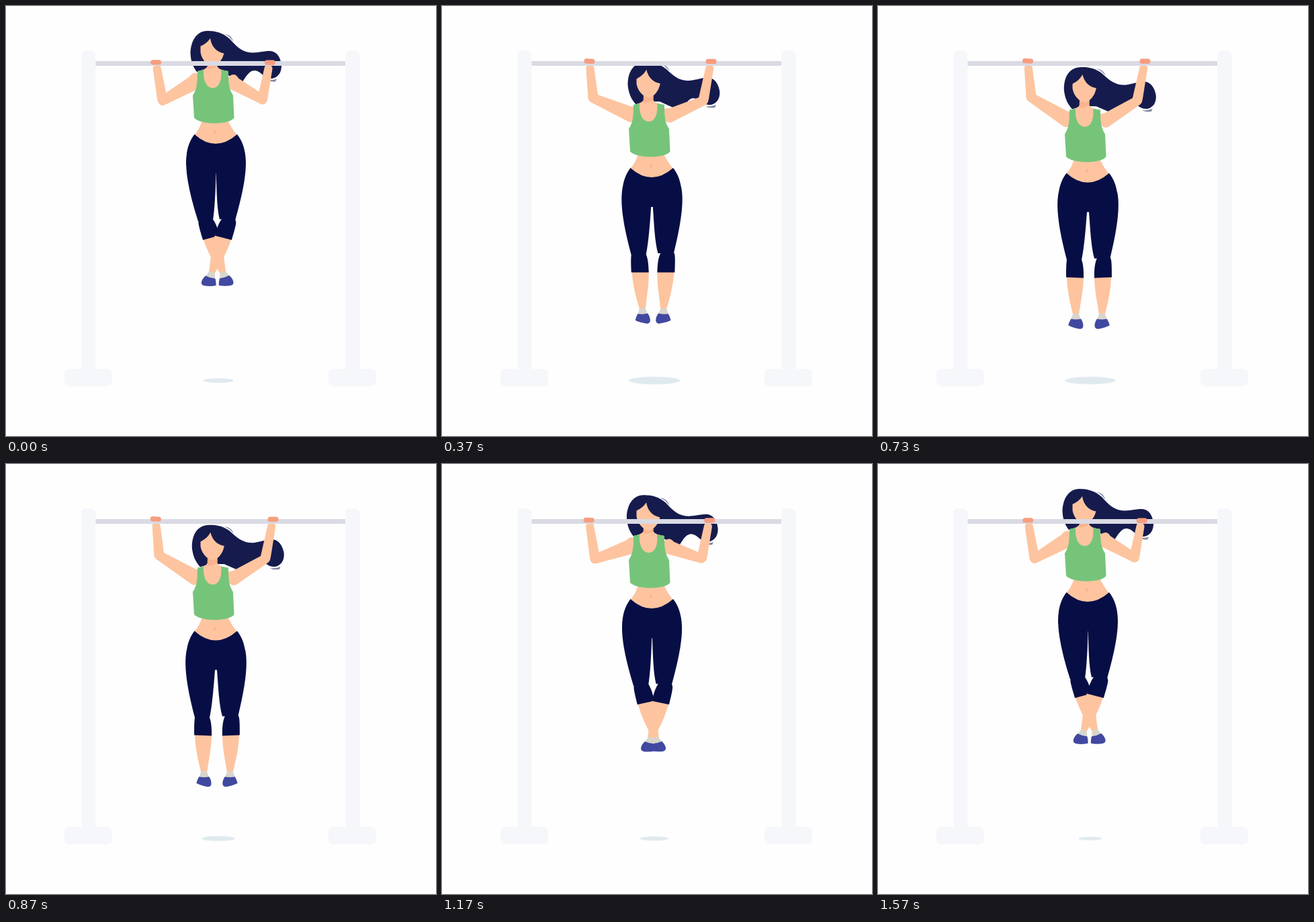
These frames come from a looping animation (640 px wide and 640 px high, 1610 ms). An HTML page without scripts:

```html
<!DOCTYPE html>
<html lang="en">
<head>
<meta charset="utf-8">
<title>Pull-ups</title>
<style>
/* --u: 0 = chin over the bar, 1 = hanging */
@property --u { syntax: '<number>'; inherits: true; initial-value: 0; }

html, body { margin: 0; width: 100%; height: 100%; overflow: hidden; background: #fefefe; }
svg {
  display: block; width: 100%; height: 100%;
  --v: calc(1 - var(--u));
  --swing: calc(var(--u) * var(--v));
  --arm: calc(31deg - 62deg * var(--u));
  animation: pull 1610ms linear infinite;
}

@keyframes pull {
  0% { --u: 0; animation-timing-function: cubic-bezier(.35, .2, .7, .75); }
  4.3% { --u: .172; }
  12.42% { --u: .517; }
  22.98% { --u: .862; animation-timing-function: cubic-bezier(.33, .67, .67, 1); }
  35.4% { --u: 1; }
  54.04% { --u: .99; animation-timing-function: cubic-bezier(.45, 0, .75, .55); }
  58.1% { --u: .862; }
  62.2% { --u: .517; animation-timing-function: cubic-bezier(.2, .55, .6, .85); }
  72.67% { --u: .172; animation-timing-function: cubic-bezier(.33, .67, .67, 1); }
  97.5%, 100% { --u: 0; }
}
@keyframes shadow {
  0% { transform: scale(.426); }
  12.42% { transform: scale(.296); }
  22.98% { transform: scale(.704); animation-timing-function: ease-out; }
  35.4% { transform: scale(1); animation-timing-function: ease-in-out; }
  54.04% { transform: scale(.463); }
  72.67% { transform: scale(.389); }
  97.5%, 100% { transform: scale(.333); }
}

.frame { fill: #f6f7fa; }
.bar { fill: #dadae4; }
.skin { fill: #fdc49f; }
.shade { fill: #fab38f; }
.dark { fill: #161b4d; }
.wisp { fill: #8587a2; }
.pants { fill: #070e45; }
.shirt { fill: #76c47a; }
.sock { fill: #d8d6cc; }
.shoe { fill: #4148a0; }
.grip { fill: #f79d80; }

.shadow { fill: #dfe9ee; transform-origin: 316px 557.4px; animation: shadow 1610ms linear infinite; }
.body { transform: translateY(calc(58px * var(--u))); }
.hair {
  transform-origin: 305px 66px;
  transform: translate(calc(2px * var(--u)), calc(-4px * var(--u))) rotate(calc(-5.4deg * var(--u)));
}
.face { transform: translateY(calc(-4px * var(--u))); }

.upper.left {
  transform: translate(283px, 111px) rotate(calc(-1 * var(--arm))) scaleX(calc(1 + .1 * var(--u)));
}
.upper.right {
  transform: translate(337px, 112.5px) rotate(var(--arm)) scaleX(calc(1 + .11 * var(--u)));
}
.reach.left { transform: translate(calc(223.2px - 32px * var(--swing)), 84px); }
.reach.right { transform: translate(calc(392.2px + 4.5px * var(--u) + 33px * var(--swing)), 84px); }
.fore.left {
  transform: rotate(calc(4.3deg * var(--u) - 9.8deg)) scaleY(calc(1 - .09 * var(--u) * var(--u)));
}
.fore.right { transform: rotate(11deg) scaleY(calc(1 - .02 * var(--u))); }
.grip.left { transform: translateY(calc(-2px * var(--u))) rotate(calc(3deg * var(--u))); }
.grip.right { transform: translate(.6px, calc(.4px - 2px * var(--u))); }

.leg.left { transform-origin: 290px 215px; transform: rotate(calc(-2.7deg * var(--v))); }
.leg.right { transform-origin: 338px 215px; transform: rotate(calc(2.3deg * var(--v))); }
.shin { transform-origin: 292px 320px; transform: rotate(calc(-14.3deg * var(--v))); }
</style>
</head>
<body>
<svg viewBox="0 0 640 640">
  <defs>
    <path id="forearm" d="M-6 9Q-6 4 0 4T6 9L7.5 56A7.5 7.5 0 0 1-7.5 56Z"/>
    <rect id="hand" x="-8" y="-3.8" width="16" height="7.4" rx="3.5"/>
    <g id="lower-leg">
      <path class="skin" d="M281 344H306C306 365 301 385 299 401H290C286 385 281 365 281 344Z"/>
      <path class="sock" d="M290 400H298.5L302 409H287Z"/>
      <path class="shoe" d="M287 408Q295 409.5 302 408C304 411 306 416 305 420Q304 423 300 423Q290 421.5 283 417.5Q284 413 287 408Z"/>
      <path class="pants" d="M281 320C283 310 300 310 303 320C306 328 306 338 306 347L280 346C280 336 280 326 281 320Z"/>
    </g>
    <g id="post">
      <path d="M112 545V74Q112 66 120 66H125.500Q133.500 66 133.500 74V545Z"/>
      <rect x="87" y="540" width="71" height="26" rx="7"/>
    </g>
  </defs>

  <rect width="640" height="640" fill="#fefefe"/>
  <ellipse class="shadow" cx="316" cy="557.4" rx="54" ry="8"/>

  <g class="body">
    <g class="hair">
      <path class="dark" d="M300 37C283 37 275 53 274.500 70C275 82 278 90 284 98L300 95L320 97L338 107L352 113C360 100 364 96 370 96C381 97 382 108 396 108C406 106 410 98 410 89C409 75 402 67 392 67C385 67 378 69 367 69.500C351 69 343 60 333 49C323 40 312 37 300 37Z"/>
      <path class="wisp" d="M325 41.500C332 42 337 47 338 53C334 47 331 44 325 41.500ZM387 109.500Q396 111 403 108.500L401 112.500Q392 113 387 109.500Z"/>
    </g>
    <path class="skin upper left" d="M-58-7L-6-10Q5-15 9-5Q8 12 0 12.500L-58 7A7 7 0 0 1-58-7Z"/>
    <path class="skin upper right" d="M51-7L5-9Q-4-14-8-5Q-8 11 0 11.500L51 7A7 7 0 0 0 51-7Z"/>
    <path class="skin" d="M300 80H314.500V90Q316 95 331 97V135H285V97Q297 95 300 90Z"/>
    <path class="shade" d="M300 82H314.500V89Q308 95 299.500 94Z"/>
    <path class="skin" d="M292 170H330Q336 183 344 192L330 212H296L280 192Q288 184 292 170Z"/>
    <ellipse class="shade" cx="311" cy="187.500" rx="1.500" ry="3"/>
    <path class="shirt" d="M285 97L294 95C293 112 299 122 308 122C317 122 322 110 320 95L331 97C331 115 332 124 338 133L339.500 166C339 169 330 174.500 310 174.500C292 174.500 281 169 280 166L278 133C284 124 285 115 285 97Z"/>
    <path class="skin face" d="M289.500 58V68C290 78 300 89.500 307 89.500C314 89.500 324 80 325 66L324 56L304 44Z"/>
    <path class="dark hair" d="M304 48Q299 56 289 60L284 62L290 42L304 40L318 42L332 60L324.500 70.500Q307 67 304 48Z"/>

    <g class="leg left">
      <g class="shin"><use href="#lower-leg"/></g>
      <path class="pants" d="M269 219C263 246 273 290 281 320H303C307 300 309 275 311 249V212Z"/>
    </g>
    <g class="leg right">
      <g transform="translate(628) scale(-1 1)"><g class="shin"><use href="#lower-leg"/></g></g>
      <path class="pants" d="M356 219C362 246 352 290 345.500 318H322C317 300 316 275 314 249V212Z"/>
    </g>
    <path class="pants" d="M280.500 191Q296 205 312 205T344 191C351 200 354 208 356 220V236L314 249H311L268 237L269 219C271 207 275 198 280.500 191Z"/>
  </g>

  <g class="reach left"><use href="#forearm" class="skin fore left"/></g>
  <g class="reach right"><use href="#forearm" class="skin fore right"/></g>

  <rect class="bar" x="133" y="82" width="373" height="7"/>
  <g class="frame">
    <use href="#post"/>
    <use href="#post" x="393"/>
  </g>

  <g class="reach left"><use href="#hand" class="grip left"/></g>
  <g class="reach right"><use href="#hand" class="grip right"/></g>
</svg>
</body>
</html>
```
